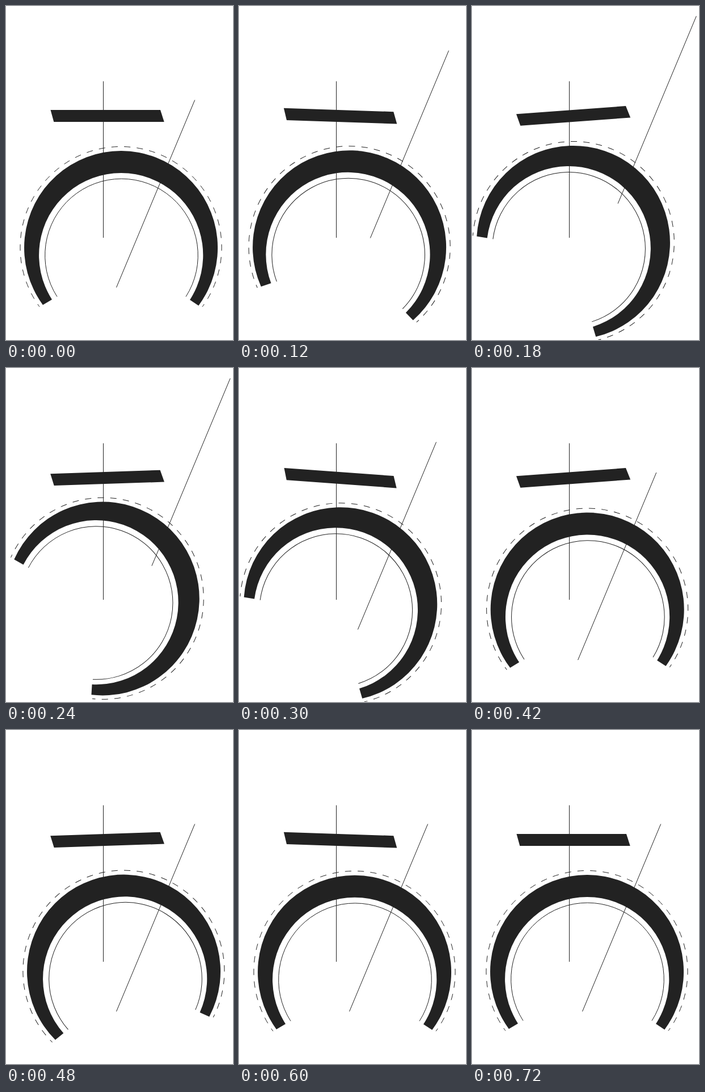
Recreate the animation shown at these times as an HTML page. Size 400 by 588 pixels, loop 0.81 s.

```html
<!DOCTYPE html>
<html lang="en">
<head>
<meta charset="utf-8">
<title>Swinging arc</title>
<style>
  html, body { margin: 0; width: 100%; height: 100%; overflow: hidden; background: #fff; }
  svg { display: block; width: 400px; height: 588px; }
  .line { fill: none; stroke: #222; stroke-width: 1; }
  .solid { fill: #222; }
</style>
</head>
<body>
<svg viewBox="0 0 400 588">
  <path class="line" d="M171.5 132.5V408"/>
  <path class="line" id="needle" d="M332.7 165.5L194.5 495.5"/>
  <path class="solid" id="bar" d="M78.5 183H272L278.7 204H84.3Z"/>
  <g id="wheel">
    <path class="solid" d="M64.9 526.2A170.5 170.5 0 1 1 339.3 527.4L324 517.3A144.6 144.6 0 1 0 81 516.7Z"/>
    <path class="line" d="M90 511.7A134.8 134.8 0 1 1 317 511.7"/>
    <path class="line" d="M59 529.5A177.5 177.5 0 1 1 346 529.5"
          pathLength="70" stroke-dasharray="1" stroke-dashoffset=".5"/>
  </g>
</svg>
<script>
const STEP = 30, LOOP = 810, END = 24;

// Smooth curve through [step, value] keys, flat at both ends and at every turning point.
function track(keys) {
  const slopes = keys.map(([t, v], i) => {
    const a = keys[i - 1], b = keys[i + 1];
    if (!a || !b || (v - a[1]) * (b[1] - v) <= 0) return 0;
    return (b[1] - a[1]) / (b[0] - a[0]);
  });
  return t => {
    const i = keys.findIndex(k => k[0] >= t);
    if (i < 0) return keys[keys.length - 1][1];
    if (i === 0) return keys[0][1];
    const [t0, v0] = keys[i - 1], [t1, v1] = keys[i];
    const span = t1 - t0, u = (t - t0) / span, w = 1 - u;
    return v0 + (v1 - v0) * u * u * (3 - 2 * u)
      + span * u * w * (slopes[i - 1] * w - slopes[i] * u);
  };
}

const wheelAngle = track([[0, 0], [4, 12.2], [8, 60], [12, 12], [16, -8.8], [18, -9.4], [20, 0], [22, 9.4], [24, 0]]);
const wheelX = track([[0, 0], [8, .4], [12, 1], [16, -.9], [20, 1], [24, 0]]);
const wheelY = track([[0, 0], [8, .4], [12, -.7], [16, -.2], [20, .7], [24, 0]]);
const needleY = track([[0, 0], [4, -87], [7, -162], [8, -147.2], [12, 37.2], [16, 0]]);
const barAngle = t => t % END ? 4.6 * Math.cos(Math.PI * (t - 2.55) / 4) : 0;

const [needle, bar, wheel] = ['needle', 'bar', 'wheel'].map(id => document.getElementById(id));
const place = (el, transform) => el.setAttribute('transform', transform);

function draw(time) {
  const t = Math.min(END, Math.floor(time % LOOP / STEP));
  const y = needleY(t);
  place(needle, `translate(${-.424 * y} ${y})`);
  place(bar, `rotate(${barAngle(t)} 176 193.5)`);
  place(wheel, `translate(${wheelX(t)} ${wheelY(t)}) rotate(${wheelAngle(t)} 203.5 387.3)`);
}

const start = performance.now();
function tick() {
  draw(performance.now() - start);
  requestAnimationFrame(tick);
}
tick();
</script>
</body>
</html>
```
